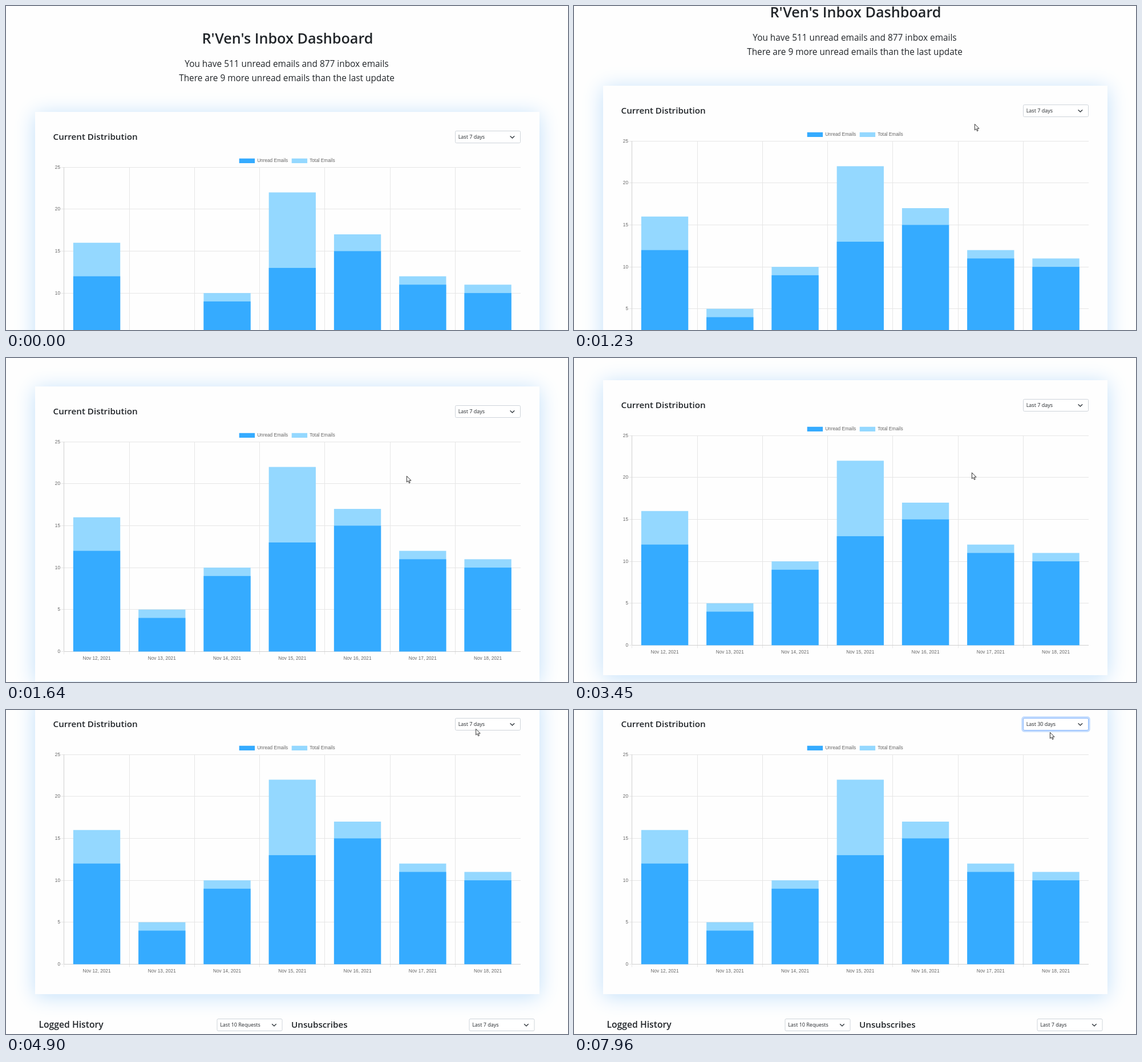
Recreate the animation shown at these times as an HTML page. Size 985 px wide and 569 px high, loop 8 s.

```html
<!DOCTYPE html>
<html lang="en">
<head>
<meta charset="utf-8">
<title>Inbox Dashboard</title>
<style>
  html, body { margin: 0; width: 100%; height: 100%; overflow: hidden; background: #fefefe; }
  #stage { position: relative; width: 985px; height: 569px; overflow: hidden; background: #fefefe; }
  #page, #overlay { position: absolute; left: 0; top: 0; }
  #page { width: 985px; height: 900px; }
  #card { position: absolute; left: 50.5px; top: 186px; width: 884px; height: 517.5px;
    background: #fefefe; box-shadow: 0 4px 34px #c2e0fb; }
  svg { position: absolute; left: 0; top: 0; display: block; }
  text { font-family: "Open Sans", "Noto Sans", sans-serif; fill: #212529; white-space: pre; }
  .title { font-size: 25.2px; font-weight: 600; text-anchor: end; }
  .lead { font-size: 15.38px; text-anchor: middle; }
  .head { font-size: 15.2px; font-weight: 600; }
  .small { font-size: 9px; }
  .chart { font: 8.22px "Liberation Sans", Arial, sans-serif; fill: #666; }
  .white { fill: #fff; }

  #page, #cursor, .anim { animation: 8s linear infinite; }
  #page { animation-name: scroll; }
  #cursor { animation-name: move; }
  #menu { animation-name: menu; }
  #hover1 { animation-name: hover1; }
  #hover2 { animation-name: hover2; }
  #ring { animation-name: ring; }
  #before { animation-name: before; }
  #after { animation-name: after; }
  #press { animation-name: press; }

  @keyframes scroll {
    0%, 12.8% { transform: translateY(0); }
    13.625% { transform: translateY(-4px); }
    14.5% { transform: translateY(-22px); }
    15.375%, 16.1% { transform: translateY(-46px); }
    16.3% { transform: translateY(-64px); }
    17.1% { transform: translateY(-72px); }
    18.75% { transform: translateY(-112px); }
    19.6% { transform: translateY(-130px); }
    20.5%, 42.3% { transform: translateY(-136px); }
    43.125%, 43.9% { transform: translateY(-147px); }
    44% { transform: translateY(-180px); }
    44.875%, 100% { transform: translateY(-205px); }
  }
  @keyframes move {
    0%, 3.24% { transform: translate(930px, 580px); }
    3.25% { transform: translate(926px, 558px); }
    7% { transform: translate(640px, 260px); }
    9% { transform: translate(509px, 160px); }
    10% { transform: translate(520px, 147px); }
    12.75%, 38% { transform: translate(702px, 207px); }
    43.125%, 43.9% { transform: translate(697px, 201px); }
    44.875%, 46.4% { transform: translate(696px, 199.5px); }
    48.25%, 49% { transform: translate(715px, 181px); }
    57.875%, 60.5% { transform: translate(828px, 23px); }
    64.75%, 72.2% { transform: translate(801px, 78px); }
    76%, 84% { transform: translate(837px, 24.5px); }
    88.5% { transform: translate(834px, 61px); }
    90%, 94.5% { transform: translate(832px, 61px); }
    99.5%, 100% { transform: translate(834px, 39px); }
  }
  @keyframes menu {
    0%, 76.49% { opacity: 0; }
    76.5%, 92.49% { opacity: 1; }
    92.5%, 100% { opacity: 0; }
  }
  @keyframes hover1 { 0%, 87.49% { opacity: 1; } 87.5%, 100% { opacity: 0; } }
  @keyframes hover2 { 0%, 87.49% { opacity: 0; } 87.5%, 100% { opacity: 1; } }
  @keyframes ring { 0%, 78.2% { opacity: 0; } 80%, 100% { opacity: 1; } }
  @keyframes before { 0%, 92.49% { opacity: 1; } 92.5%, 100% { opacity: 0; } }
  @keyframes after { 0%, 92.49% { opacity: 0; } 92.5%, 100% { opacity: 1; } }
  @keyframes press {
    0%, 75.59% { opacity: 0; }
    75.6%, 78.6% { opacity: 1; }
    79.5%, 91.2% { opacity: 0; }
    91.21%, 93% { opacity: 1; }
    94%, 100% { opacity: 0; }
  }
</style>
</head>
<body>
<div id="stage">
  <div id="page">
    <div id="card"></div>
    <svg width="985" height="900">
      <text class="title" x="643.5" y="66">R'Ven's Inbox Dashboard</text>
      <text class="lead" x="492" y="107">You have 511 unread emails and 877 inbox emails</text>
      <text class="lead" x="492" y="132">There are 9 more unread emails than the last update</text>
      <text class="head" x="82.5" y="235">Current Distribution</text>
      <text class="head" x="57.5" y="763" style="font-size:15.7px">Logged History</text>
      <text class="head" x="500" y="763">Unsubscribes</text>
      <g id="chart"></g>
      <g id="selects"></g>
      <g id="ring" class="anim" fill="none">
        <rect x="785.65" y="217.65" width="117.7" height="24.7" rx="3.5" stroke="#c2dbfe" stroke-width="2.7"/>
        <rect x="787.5" y="219.5" width="114" height="21" rx="2" stroke="#86b7fe"/>
      </g>
      <text id="before" class="small anim" x="792.7" y="233.2">Last 7 days</text>
      <text id="after" class="small anim" x="792.7" y="233.2">Last 30 days</text>
    </svg>
  </div>
  <svg id="overlay" width="985" height="569">
    <g id="menu" class="anim">
      <rect x="787.5" y="35.5" width="114" height="56" fill="#fff" stroke="#85888c"
        style="filter:drop-shadow(1px 1px 1.5px rgba(0,0,0,.35))"/>
      <g id="options"></g>
    </g>
    <g id="cursor">
      <circle id="press" class="anim" r="8.3" cy=".5" fill="#ffe81a" fill-opacity=".75"/>
      <path d="M.4.4V11L2.8 8.8 4.5 12.7 6.2 12 4.5 8.2H8Z" fill="#fff" stroke="#111" stroke-width=".85"/>
    </g>
  </svg>
</div>
<script>
  const NS = "http://www.w3.org/2000/svg";
  const byId = id => document.getElementById(id);

  function add(parent, tag, attrs, content) {
    const el = document.createElementNS(NS, tag);
    for (const key in attrs) el.setAttribute(key, attrs[key]);
    if (content !== undefined) el.textContent = content;
    parent.append(el);
    return el;
  }

  // Chart
  const DARK = "#35abff", LIGHT = "#94d8ff", GRID = "#e6e6e6", AXIS = "#d0d0d0";
  const left = 102, right = 902, top25 = 283.2, base = 651.4;
  const slot = 114.25, barWidth = 82.3;
  const unread = [12, 4, 9, 13, 15, 11, 10];
  const total = [16, 5, 10, 22, 17, 12, 11];
  const chart = byId("chart");
  const yOf = value => base - value * (base - top25) / 25;
  const crisp = value => Math.floor(value) + .5;
  const rect = (x, y, width, height, fill) => add(chart, "rect", { x, y, width, height, fill });
  const line = (x1, y1, x2, y2, stroke) => add(chart, "line", { x1, y1, x2, y2, stroke });
  const label = (x, y, anchor, content) =>
    add(chart, "text", { x, y, class: "chart", "text-anchor": anchor }, content);

  for (let i = 0; i < 7; i++) {
    const x = crisp(left + i * slot - .2);
    line(x, 283, x, 656.5, GRID);
  }
  for (let value = 0; value <= 25; value += 5) {
    const y = crisp(yOf(value));
    line(96.5, y, right, y, GRID);
    label(95, y + 2.5, "end", value);
  }
  line(101.5, 283, 101.5, 651, AXIS);
  line(left, 651.5, right, 651.5, AXIS);

  unread.forEach((count, i) => {
    const x = 117.9 + i * slot;
    rect(x, yOf(total[i]), barWidth, base - yOf(total[i]), LIGHT);
    rect(x, yOf(count), barWidth, base - yOf(count), DARK);
    label(x + barWidth / 2, 666.3, "middle", `Nov ${12 + i}, 2021`);
  });

  [[408.7, DARK, "Unread Emails"], [500.7, LIGHT, "Total Emails"]].forEach(([x, fill, name]) => {
    rect(x, 267.8, 27.4, 8.2, fill);
    label(x + 31.5, 274.4, "start", name);
  });

  // Select boxes
  const selects = byId("selects");
  function select(x, y, content) {
    add(selects, "rect", { x, y, width: 114, height: 21, rx: 2, fill: "#fff", stroke: "#ced4da" });
    add(selects, "path", {
      d: `M${x + 96.5} ${y + 9.2}l3.4 3.4 3.4-3.4`, fill: "none", stroke: "#343a40",
      "stroke-width": 1.4, "stroke-linecap": "round", "stroke-linejoin": "round"
    });
    if (content) add(selects, "text", { x: x + 5.2, y: y + 13.7, class: "small" }, content);
  }
  select(787.5, 219.5);
  select(370, 747.5, "Last 10 Requests");
  select(812, 747.5, "Last 7 days");

  // Open menu, with a highlight for each hovered row
  const options = byId("options");
  const rows = ["Last 7 days", "Last 30 days", "Last 12 months", "Last 5 years"];
  const rowY = i => 36 + i * 13.7;
  const option = (parent, i, cls) =>
    add(parent, "text", { x: 793.2, y: rowY(i) + 10.5, class: cls }, rows[i]);
  rows.forEach((row, i) => option(options, i, "small"));
  [0, 1].forEach(i => {
    const hover = add(options, "g", { id: "hover" + (i + 1), class: "anim" });
    add(hover, "rect", { x: 788, y: rowY(i), width: 113, height: 13.8, fill: "#1e90ff" });
    option(hover, i, "small white");
  });
</script>
</body>
</html>
```
